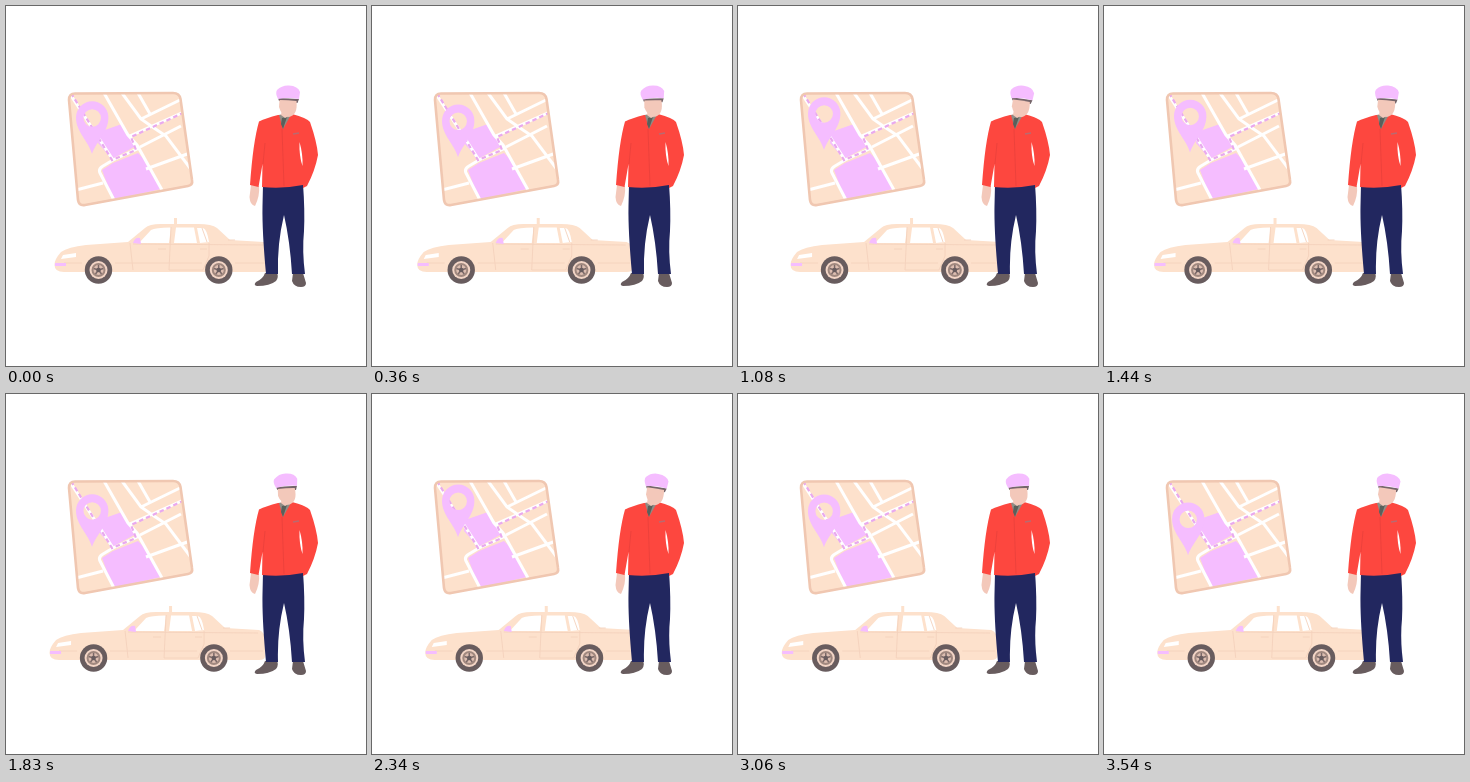
Recreate the animation shown at these times as an HTML page. Size 360 px wide and 360 px high, loop 3600 ms.

```html
<!DOCTYPE html>
<html lang="en">
<head>
<meta charset="utf-8">
<title>Taxi driver</title>
<style>
  html, body { margin: 0; width: 100%; height: 100%; overflow: hidden; background: #fff; }
  svg { display: block; width: 100vw; height: 100vh; }
  .peach { fill: #fde1cc; }
  .pink { fill: #f5bdff; }
  .skin { fill: #f3c8ba; }
  .dark { fill: #685c5e; }
  .line { fill: none; stroke: #f4d2bd; stroke-width: .9; }
  .road { fill: none; stroke: #fff; stroke-width: 3; }
</style>
</head>
<body>
<svg viewBox="0 0 360 360">
  <defs>
    <path id="outline" d="M69 87.500L167 87Q173.500 87 174.500 93L186 174Q187 179 182 180L79 199Q73 200 72 194L63 94Q63 87.500 69 87.500Z"/>
    <clipPath id="sheet"><use href="#outline"/></clipPath>
    <g id="wheel">
      <circle r="13.700" class="dark"/>
      <circle r="9" fill="#f3d5c6"/>
      <circle r="6" fill="#dcbdb0" stroke="#a0887f" stroke-width="2"/>
      <path d="M0 0V-5M0 0L4.800 -1.500M0 0L3 4M0 0L-3 4M0 0L-4.800 -1.500" stroke="#7b6968" stroke-width="1.500"/>
      <circle r="2.300" class="dark"/>
    </g>
  </defs>

  <g id="map">
    <g clip-path="url(#sheet)">
      <path class="peach" d="M60 84H190V202H60Z"/>
      <path class="pink" d="M93 126L116 118L130 140L106 153L92 137ZM96 164L107 157L132 147L138 153L155 183L107 194Z"/>
      <path class="road" d="M98 87L122 129L131 139L156 184M116 87L135 113L148 122L160 130L187 166M132 87L144 108
        M135 113L174 94M140 163L184 147M134 141L175 120M70 184L97 177M108 194L94 167Q92 163 97 160L107 154L64 88M107 154L131 143L124 130L180 105"/>
      <path d="M65 87L106 154L130 144L125 131L177 107" fill="none" stroke="#e9a9ee" stroke-width="2.200" stroke-dasharray="4.500 3"/>
    </g>
    <use href="#outline" fill="none" stroke="#f0c7b1" stroke-width="2.600"/>
    <path id="pin" class="pink" fill-rule="evenodd" d="M86 148C82.500 135 70 126 70 111.500A16.200 16.200 0 0 1 102.400 111.500C102.400 126 90.500 135 86 148ZM77.500 112A8.700 8.700 0 0 0 94.900 112A8.700 8.700 0 0 0 77.500 112Z"/>
  </g>

  <g id="car">
    <path class="peach" d="M168 212H171V219H168ZM48.500 259Q48 254 55 246Q62 241 80 239L122 236L139 222Q143 218 155 218H192Q206 218 211 222L224 234L258 236Q264 238 264 247V262Q264 266 258 266H58Q48.500 266 48.500 259Z"/>
    <path fill="#fff" d="M133 237L145 224Q149 221.500 165 221.500L163 237ZM168 237L170 221.500H188L191 237ZM191 222H197Q201 223 203 236L194 237Z"/>
    <path class="line" d="M124 237L127 264M165 221L163 264H197L203 250V237M127 238L257 239M58 257H76M109 257H196M229 257H262M196 222L201 236M152 243H160M194 243H201M222 234H229"/>
    <path d="M57 249L70 247L70 251L55 253Z" fill="#fff"/>
    <path class="pink" d="M49 257H60V260H49ZM127 237Q129 231 134 232L135 238Z"/>
    <use href="#wheel" x="92.500" y="264"/>
    <use href="#wheel" x="212.800" y="264"/>
  </g>

  <g id="man">
    <path class="skin" d="M245 179L253 180Q254 190 249 200Q244 199 243.500 191Z"/>
    <path class="dark" d="M259 267H271Q273 271 270 275Q264 280 251 280Q247 279 250 276Q257 273 259 267ZM287 267H297L300 277Q300 281 295 281Q288 281 286 275Z"/>
    <path fill="#22275f" d="M257 178H297Q299 205 298 225Q296 245 299 268H286Q284 235 278 209Q271 238 272 268H260Q256 225 256.500 200Z"/>
    <path fill="#fd473f" d="M272 109L286 108Q301 112 304 116Q311 136 312 149Q309 165 301 180L297 182V179Q277 183 256 181L256.500 158L252.500 181L244 179Q247 136 253 115.500Q260 112 272 109Z"/>
    <path d="M293.500 136Q297 148 296.500 160Q293 150 293.500 136Z" fill="#fff"/>
    <path d="M257 158L259 137M276 123L278 180" fill="none" stroke="#e9403b" stroke-width=".8"/>
    <path d="M273 109L286 107L277 123Z" fill="#8f8d86"/>
    <path d="M276 112L281 111L279 117L277 123L275 118Z" fill="#59605b"/>
    <path d="M287 128L293 127" stroke="#b96a70" stroke-width="1.500"/>
    <path class="skin" d="M276 103H287V108L279 112L275 109Z"/>
    <g id="head">
      <path d="M272 92L293 93L291.500 97L273 95Z" fill="#75656a"/>
      <path class="skin" d="M273.500 94Q282 94 290.500 95Q292 109 283 111Q275 109 273 101Z"/>
      <path class="pink" d="M272 93Q269 87 271 84Q276 79 283 79.500Q292 80 294 86L293 93Q282 91 272 93Z"/>
    </g>
  </g>
</svg>
<script>
  const LOOP = 3600, HALF = 600;
  const [car, head, pin] = ["car", "head", "pin"].map(id => document.getElementById(id));
  const ease = p => (1 - Math.cos(Math.PI * p)) / 2;

  // Leaves the rest pose once, then swings between -1 and 1.
  const swing = t => t < HALF ? -ease(t / HALF) : Math.cos(Math.PI * t / HALF);

  function draw(now) {
    const t = now % LOOP, s = swing(t);
    car.setAttribute("transform", `translate(${5 * s})`);
    head.setAttribute("transform", `rotate(${6.5 * s} 281 110)`);
    // The pin drops further on its last move.
    const drop = t > 5 * HALF ? ease(t / HALF - 5) : 0;
    const y = drop ? 5 + 8.5 * drop : -5 * s;
    pin.setAttribute("transform", `translate(${-2 * drop} ${y})`);
  }

  let start;
  function tick(now) {
    start ??= now;
    draw(now - start);
    requestAnimationFrame(tick);
  }
  draw(0);
  requestAnimationFrame(tick);
</script>
</body>
</html>
```
